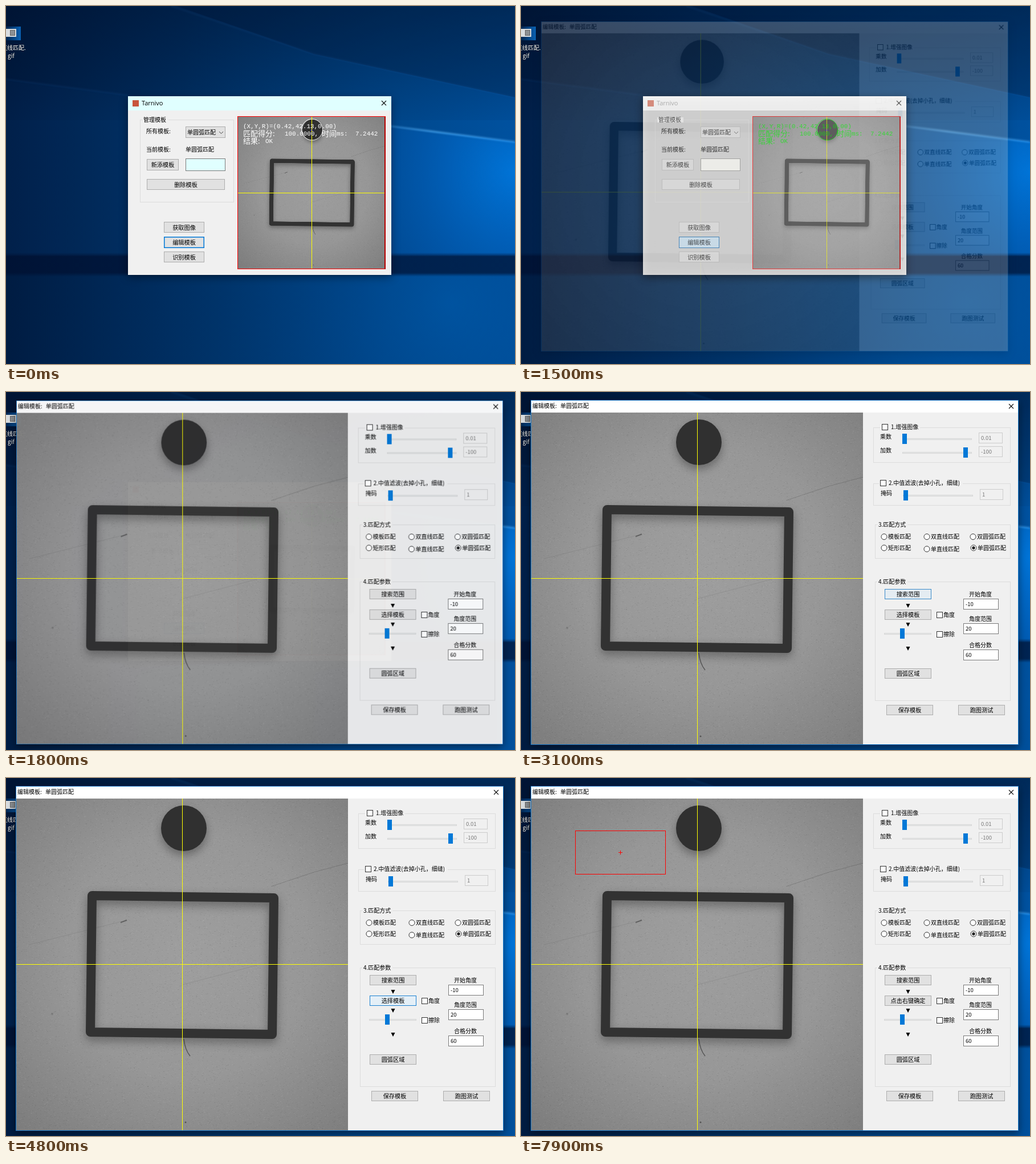
An HTML page with a canvas that plays this animation: 893x627 px, repeating every 8 s.

```html
<!DOCTYPE html>
<html lang="zh-CN">
<head>
<meta charset="utf-8">
<title>编辑模板</title>
<style>
html, body { margin: 0; width: 100%; height: 100%; overflow: hidden; background: #001c42; }
canvas { display: block; }
</style>
</head>
<body>
<canvas id="stage" width="893" height="627"></canvas>
<script>
const W = 893, H = 627, LOOP = 8000;
const SANS = '"Noto Sans CJK SC", "Noto Sans CJK", "Noto Sans", sans-serif';
const MONO = '"Liberation Mono", "Noto Sans CJK SC", monospace';
const screen = document.getElementById('stage').getContext('2d');
let g = screen; // context the helpers draw on

function layer(w, h, draw) {
  const c = document.createElement('canvas');
  c.width = w;
  c.height = h;
  const old = g;
  g = c.getContext('2d');
  if (draw) draw();
  g = old;
  return c;
}

const ramp = (t, a, b) => Math.min(1, Math.max(0, (t - a) / (b - a)));
const mix = (a, b, k) => a.map((v, i) => v + (b[i] - v) * k);
const rgb = c => `rgb(${c.map(Math.round)})`;

function box(x, y, w, h, fill, stroke, lw = 1) {
  if (fill) { g.fillStyle = fill; g.fillRect(x, y, w, h); }
  if (stroke) {
    g.strokeStyle = stroke;
    g.lineWidth = lw;
    g.strokeRect(x + lw / 2, y + lw / 2, w - lw, h - lw);
  }
}

// y is the vertical middle of the line
function text(s, x, y, color = '#000', size = 10, font = SANS, align = 'left') {
  g.font = `${size}px ${font}`;
  g.textAlign = align;
  g.fillStyle = color;
  g.fillText(s, x, y + size * 0.37);
}

function path(color, lw, ...p) {
  g.strokeStyle = color;
  g.lineWidth = lw;
  g.beginPath();
  for (let i = 0; i < p.length; i += 2) g.lineTo(p[i], p[i + 1]);
  g.stroke();
}

function poly(fill, ...p) {
  g.fillStyle = fill;
  g.beginPath();
  for (let i = 0; i < p.length; i += 2) g.lineTo(p[i], p[i + 1]);
  g.fill();
}

function disc(x, y, r, fill, stroke) {
  g.beginPath();
  g.arc(x, y, r, 0, 7);
  if (fill) { g.fillStyle = fill; g.fill(); }
  if (stroke) { g.strokeStyle = stroke; g.lineWidth = 1; g.stroke(); }
}

function stops(grad, ...list) {
  list.forEach((c, i) => grad.addColorStop(i / (list.length - 1), c));
  return grad;
}
const linear = (x0, y0, x1, y1, ...c) => stops(g.createLinearGradient(x0, y0, x1, y1), ...c);
const radial = (x, y, r, ...c) => stops(g.createRadialGradient(x, y, 0, x, y, r), ...c);

// Form controls
const NORMAL = { fill: [225, 225, 225], edge: [173, 173, 173] };
const HOVER = { fill: [229, 241, 251], edge: [0, 120, 215] };
const PRESS = { fill: [204, 228, 247], edge: [0, 84, 153] };
const blend = (a, b, k) => ({ fill: mix(a.fill, b.fill, k), edge: mix(a.edge, b.edge, k) });

function button(label, x, y, w, h, look = NORMAL, lw = 1) {
  box(x, y, w, h, rgb(look.fill), rgb(look.edge), lw);
  text(label, x + w / 2, y + h / 2 + 0.5, '#000', 10.2, SANS, 'center');
}

function group(label, x, y, w, h, lx, lw) {
  box(x, y, w, h, null, '#dcdcdc');
  box(lx - 2, y - 4, lw + 4, 9, '#f0f0f0');
  text(label, lx, y);
}

function check(label, x, y, lx) {
  box(x, y, 11, 11, '#fff', '#333');
  text(label, lx, y + 5.5);
}

function radio(label, x, y, on) {
  disc(x, y, 5, '#fff', '#333');
  if (on) disc(x, y, 2.7, '#222');
  text(label, x + 7, y);
}

function slider(x, y, w, thumb) {
  box(x, y - 1, w, 3, '#e7eaea', '#d6d6d6');
  box(thumb, y - 9, 8, 18, '#0078d7');
}

function field(value, x, y, w, off) {
  box(x, y, w, 19, off ? '#f0f0f0' : '#fff', off ? '#ccc' : '#7a7a7a');
  text(value, x + 4, y + 9, off ? '#777' : '#000', 9.5);
}

function cross(x, y, r, color) {
  path(color, 1, x - r, y + 0.5, x + r + 1, y + 0.5);
  path(color, 1, x + 0.5, y - r, x + 0.5, y + r + 1);
}

function closeMark(x, y) {
  path('#111', 1.1, x - 4, y - 4, x + 4, y + 4);
  path('#111', 1.1, x + 4, y - 4, x - 4, y + 4);
}

// Static pictures
const desktop = layer(W, H, () => {
  box(0, 0, W, H, linear(0, 0, W, 0, '#001c42', '#002a5a', '#003871', '#004587', '#004e98'));
  poly('rgba(30,110,200,.06)', 0, 128, 214, 156, 500, 190, 893, 245, 893, 437, 0, 437);
  poly(linear(300, 0, 893, 0, 'rgba(0,110,220,0)', 'rgba(0,110,220,.1)'),
    300, 0, 540, 84, 893, 160, 893, 240, 640, 206, 300, 165);
  box(0, 0, W, 200, linear(0, 0, 0, 200, 'rgba(0,8,30,.4)', 'rgba(0,8,30,.05)'));
  poly('rgba(0,10,35,.2)', 560, 0, 893, 0, 893, 160, 540, 84, 300, 0);
  poly(radial(893, 290, 330, 'rgba(0,128,235,.75)', 'rgba(0,110,215,.35)', 'rgba(0,90,190,0)'),
    560, 196, 893, 238, 893, 437, 560, 437);
  g.filter = 'blur(1.5px)';
  path(linear(600, 0, 893, 0, 'rgba(90,180,255,0)', 'rgba(90,185,255,.7)', 'rgba(70,170,250,.6)'),
    3, 600, 201, 893, 238);
  path('rgba(60,140,220,.1)', 2, 290, 0, 540, 84, 893, 160);
  path('rgba(50,120,200,.12)', 2, 0, 128, 214, 156);
  g.filter = 'none';
  box(0, 470, W, 157, radial(780, 520, 400, 'rgba(0,96,182,.42)', 'rgba(0,80,160,.2)', 'rgba(0,60,130,0)'));
  const band = 'rgba(0,14,46,.66)';
  box(0, 432, W, 42, linear(0, 432, 0, 474, 'rgba(0,14,46,0)', band, band, band, band, band, 'rgba(0,14,46,0)'));

  box(0, 36, 26, 24, linear(0, 0, 26, 0, '#02254f', '#0a62b4'));
  box(0, 40, 18, 14, '#d9dde0');
  box(7, 42, 9, 10, '#8c9094', '#666');
  g.shadowColor = '#000';
  g.shadowBlur = 2;
  text('直线匹配.', -8, 73, '#fff', 10);
  text('gif', 3, 87, '#fff', 10);
});

const photo = layer(583, 581, () => {
  g.translate(-17, -36);
  box(17, 36, 583, 581, radial(320, 310, 430, '#9e9e9e', '#979797', '#7c7c7c'));
  let seed = 7;
  const rnd = () => (seed = seed * 16807 % 2147483647) / 2147483647;
  for (let i = 0; i < 16000; i++) {
    g.fillStyle = i % 2 ? 'rgba(0,0,0,.05)' : 'rgba(255,255,255,.05)';
    g.fillRect(17 + rnd() * 583 | 0, 36 + rnd() * 581 | 0, 2, 1);
  }
  path('rgba(50,50,50,.25)', 1, 465, 190, 540, 165, 600, 149);
  path('rgba(50,50,50,.12)', 1, 40, 292, 200, 252);
  path('rgba(50,50,50,.12)', 1, 310, 362, 440, 328);
  path('rgba(40,40,40,.5)', 2, 201, 253, 212, 249);
  disc(315, 603, 1.5, '#555');
  disc(81, 413, 1.8, '#777');
  g.strokeStyle = 'rgba(40,40,40,.6)';
  g.lineWidth = 1.5;
  g.beginPath();
  g.moveTo(312, 457);
  g.quadraticCurveTo(314, 476, 323, 487);
  g.stroke();

  g.shadowColor = 'rgba(40,40,40,.45)';
  g.shadowBlur = 16;
  g.shadowOffsetY = 7;
  disc(312, 88, 40, '#303030');
  g.lineJoin = 'round';
  g.lineWidth = 16;
  g.strokeStyle = '#323232';
  g.beginPath();
  [[151, 206], [470, 210], [467, 449], [148, 445]].forEach(p => g.lineTo(...p));
  g.closePath();
  g.stroke();
});

function mainWindow(t) {
  const active = t < 1500;
  const ink = active ? '#fff' : '#00f000';
  g.save();
  g.shadowColor = 'rgba(0,0,0,.4)';
  g.shadowBlur = 14;
  g.shadowOffsetY = 4;
  box(214, 158, 462, 313, '#f0f0f0');
  g.restore();
  box(214, 158, 462, 25, active ? '#e0ffff' : '#fff');
  box(222, 165, 11, 11, '#c8553d');
  text('Tarnivo', 238, 170, active ? '#000' : '#8a8a8a', 11, '"Open Sans", "Noto Sans", sans-serif');
  closeMark(663, 170);

  group('管理模板', 235, 199, 165, 145, 241, 42);
  text('所有模板:', 246, 219);
  text('当前模板:', 246, 251);
  text('单圆弧匹配', 315, 251);
  box(315, 211, 70, 20, '#e1e1e1', '#adadad');
  text('单圆弧匹配', 318, 221.5);
  path('#444', 1, 374, 220, 377.5, 223.5, 381, 220);
  button('新添模板', 247, 268, 56, 20);
  box(315, 267, 70, 22, active ? '#e0ffff' : '#fffffa', '#7a7a7a');
  button('删除模板', 247, 303, 137, 19);
  button('获取图像', 277, 378, 71, 19);
  const focus = { fill: NORMAL.fill, edge: HOVER.edge };
  button('编辑模板', 277, 404, 71, 20, blend(focus, PRESS, ramp(t, 1000, 1400)), active ? 1.5 : 1);
  button('识别模板', 277, 430, 71, 19);

  g.drawImage(photo, 407, 193, 259, 267);
  disc(537, 216.5, 18.5, null, ink);
  cross(536, 217, 2, '#22f');
  path('#ff0', 1, 407, 327.5, 666, 327.5);
  path('#ff0', 1, 536.5, 194, 536.5, 461);
  box(406, 193, 260, 268, null, '#f00');
  box(664, 194, 2, 267, '#b80000');

  const mono = (s, x, y) => text(s, x, y, ink, 10.93, MONO);
  const wide = (s, x, y) => text(s, x, y, ink, 13);
  mono('(X,Y,R)=(0.42,42.13,0.00)', 416, 210);
  wide('匹配得分:', 416, 223);
  mono('100.0000,', 489, 223);
  wide('时间', 554, 223);
  mono('ms:', 580, 223);
  mono('7.2442', 613, 223);
  wide('结果:', 416, 236);
  mono('OK', 455, 236);
}

function editWindow(t) {
  box(0, 0, W, H, '#f0f0f0');
  box(17, 14, 856, 22, '#fff');
  text('编辑模板:', 20, 24.5);
  text('单圆弧匹配', 69, 24.5);
  closeMark(860, 25);
  g.drawImage(photo, 17, 36);
  path('#ff0', 1, 17, 326.5, 600, 326.5);
  path('#ff0', 1, 309.5, 36, 309.5, 617);

  group('', 618, 62, 241, 62, 632, 66);
  check('1.增强图像', 633, 56, 649);
  text('乘数', 630, 78);
  slider(669, 82, 122, 669);
  field('0.01', 803, 71, 42, true);
  text('加数', 630, 102);
  slider(669, 106, 122, 776);
  field('-100', 803, 95, 42, true);

  group('', 618, 160, 241, 39, 630, 143);
  check('2.中值滤波(去掉小孔，细缝)', 630, 154, 645);
  text('掩码', 631, 177);
  slider(670, 181, 123, 671);
  field('1', 805, 170, 41, true);

  group('3.匹配方式', 621, 232, 238, 60, 627, 49);
  radio('模板匹配', 637, 253.5);
  radio('双直线匹配', 712, 253.5);
  radio('双圆弧匹配', 793, 253.5);
  radio('矩形匹配', 637, 273);
  radio('单直线匹配', 712, 275);
  radio('单圆弧匹配', 794, 273, true);

  group('4.匹配参数', 621, 332, 238, 209, 627, 49);
  const search = ramp(t, 2900, 3200) - ramp(t, 3700, 4400);
  button('搜索范围', 638, 345, 82, 18, blend(NORMAL, HOVER, search));
  let look = blend(NORMAL, HOVER, t < 4800 ? 0 : 0.85);
  look = blend(look, PRESS, ramp(t, 5600, 5900));
  look = blend(look, NORMAL, ramp(t, 6500, 7400));
  button(t < 6600 ? '选择模板' : '点击右键确定', 638, 381, 82, 18, look);
  for (const y of [374, 407, 449]) poly('#000', 675.5, y - 3, 682.5, y - 3, 679, y + 4);
  slider(637, 423, 83, 665);
  check('角度', 729, 385, 741);
  check('擦除', 729, 419, 741);
  [['开始角度', 354, '-10', 362], ['角度范围', 397, '20', 405], ['合格分数', 443, '60', 451]]
    .forEach(([label, y, value, top]) => {
      text(label, 786, y);
      field(value, 776, top, 62);
    });
  button('圆弧区域', 638, 484, 82, 18);
  button('保存模板', 641, 548, 82, 18);
  button('跑图测试', 767, 548, 82, 18);

  if (t >= 7900) {
    box(95, 92, 159, 77, null, '#f00');
    cross(174, 130, 3, '#f00');
  } else if (t >= 7500) cross(96, 92, 3, '#f00');
  box(17, 14, 856, 604, null, '#1878c8');
}

// Opening of the editor: [time, scale, opacity, opacity of the main window above it]
const OPENING = [
  [1500, 0.958, 0.22, 0.6], [1700, 0.988, 0.8, 0], [1800, 0.998, 0.96, 0],
  [1900, 1, 0.99, 0], [2000, 1, 1, 0]
];
const editor = layer(W, H);
const editorCtx = editor.getContext('2d');

function draw(t) {
  g = screen;
  g.drawImage(desktop, 0, 0);
  mainWindow(t);
  const step = OPENING.filter(s => s[0] <= t).pop();
  if (!step) return;
  const [, scale, alpha, above] = step;
  g = editorCtx;
  editWindow(t);
  g = screen;
  g.save();
  g.translate(445, 316);
  g.scale(scale, scale);
  g.globalAlpha = alpha;
  g.shadowColor = 'rgba(0,0,0,.5)';
  g.shadowBlur = 14;
  g.shadowOffsetY = 4;
  g.drawImage(editor, 17, 14, 856, 604, -428, -302, 856, 604);
  g.restore();
  if (above) {
    g.globalAlpha = above;
    mainWindow(t);
    g.globalAlpha = 1;
  }
}

function tick(now) {
  draw(Math.floor(now % LOOP / 100) * 100);
  requestAnimationFrame(tick);
}
requestAnimationFrame(tick);
</script>
</body>
</html>
```
